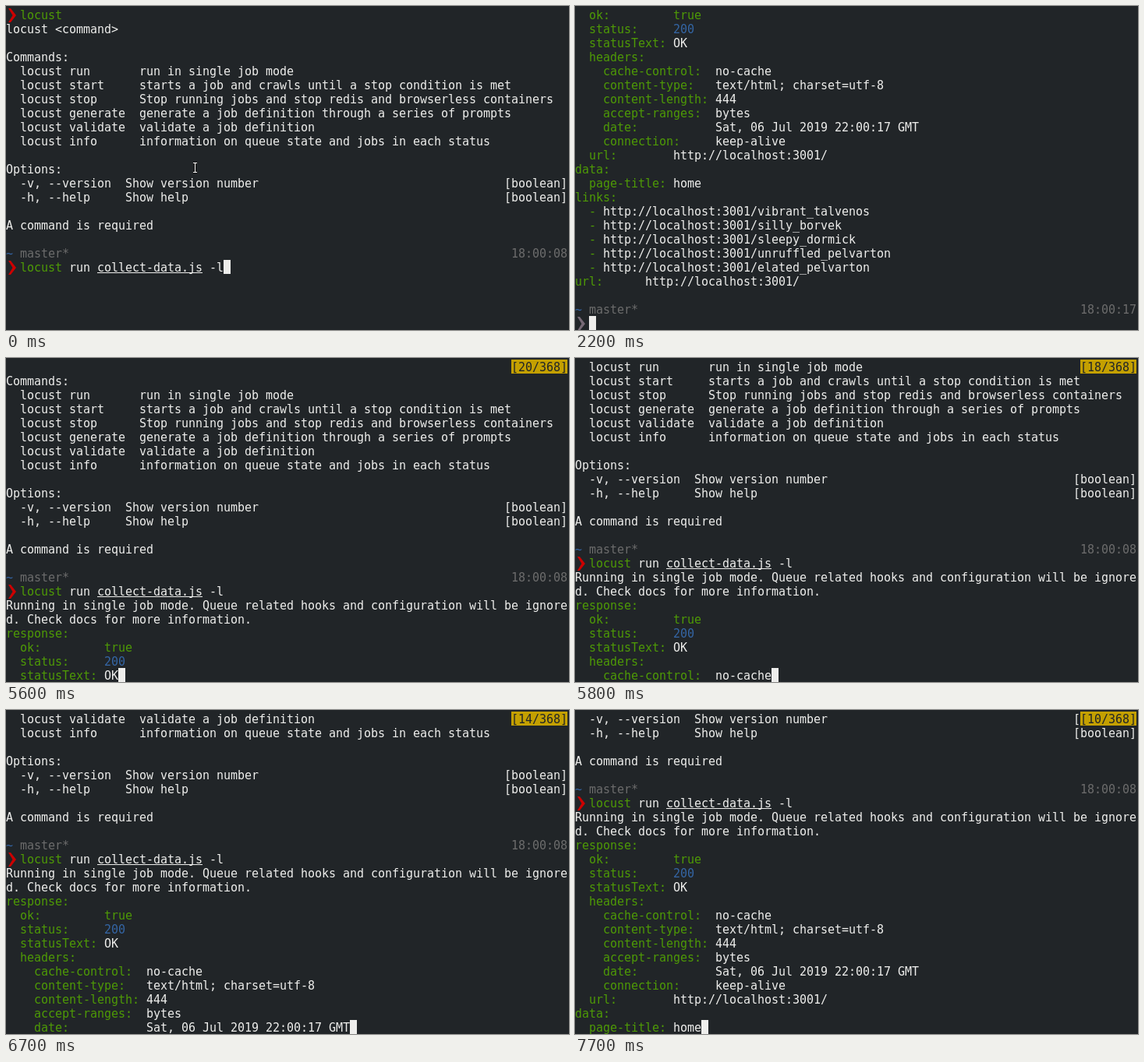
An HTML page for the animation above (8000 ms loop, 722 by 416 pixels).

```html
<!DOCTYPE html>
<html lang="en">
<head>
<meta charset="utf-8">
<title>Terminal session</title>
<style>
  html, body { margin: 0; width: 722px; height: 416px; overflow: hidden; background: #212528; }
  body { position: relative; }
  pre, #badge {
    margin: 0; color: #eeeeec;
    font: 15px/18px "DejaVu Sans Mono", monospace;
    letter-spacing: -.0308px; /* 9px cells */
    font-variant-ligatures: none;
  }
  pre { position: absolute; left: 0; top: 3px; }
  pre div { height: 18px; }
  #cursor, #badge, #mouse { position: absolute; }
  #cursor { width: 9px; height: 18px; background: #eeeeec; }
  #badge { left: 648px; top: 2px; width: 72px; height: 17px; padding-top: 1px; background: #c4a000; color: #212528; }
  #mouse { left: 0; top: 0; fill: none; }
  .green { color: #4e9a06; }
  .blue { color: #3465a4; }
  .grey { color: #6c6c6c; }
  .file { text-decoration: underline 1px; text-underline-offset: 1px; text-decoration-skip-ink: none; }
  .prompt { position: relative; color: #cc0000; }
  .prompt.done { color: #776a76; }
  .prompt::before {
    content: ""; position: absolute; left: 3px; top: 0; width: 10px; height: 18px;
    background: currentColor;
    clip-path: polygon(0 0, 30% 0, 100% 50%, 30% 100%, 0 100%, 55% 50%);
  }
</style>
</head>
<body>
<pre id="screen"></pre>
<div id="cursor"></div>
<div id="badge"></div>
<svg id="mouse" width="722" height="416">
  <path id="beam" d="M240 201.5h2m1 0h2M242.5 201v13M240 213.5h2m1 0h2" stroke="#111" stroke-width="3"/>
  <use href="#beam"/>
  <path d="M240 201.5h5M242.5 201v13M240 213.5h5" stroke="#fff"/>
</svg>
<script>
const ROWS = 23, LOOP = 8000;
const span = (cls, text) => `<span class="${cls}">${text}</span>`;
const green = text => span('green', text);
const prompt = (cls = '') => span('prompt ' + cls, ' ') + ' ';
const status = time => span('blue', '~') + span('grey', ' master*'.padEnd(71) + time);
const command = (name, about) => `  locust ${name}`.padEnd(19) + about;
const option = (flags, about) => `  ${flags}`.padEnd(17) + about.padEnd(54) + '[boolean]';
const field = (key, value, column) => green(key.padEnd(column)) + value;
const head = (key, value) => field(`    ${key}:`, value, 20);
const home = 'http://localhost:3001/';
const link = name => green('  - ') + home + name;

const lines = [
  prompt() + green('locust'),
  'locust &lt;command&gt;',
  '',
  'Commands:',
  command('run', 'run in single job mode'),
  command('start', 'starts a job and crawls until a stop condition is met'),
  command('stop', 'Stop running jobs and stop redis and browserless containers'),
  command('generate', 'generate a job definition through a series of prompts'),
  command('validate', 'validate a job definition'),
  command('info', 'information on queue state and jobs in each status'),
  '',
  'Options:',
  option('-v, --version', 'Show version number'),
  option('-h, --help', 'Show help'),
  '',
  'A command is required',
  '',
  status('18:00:08'),
  prompt() + green('locust') + ' run ' + span('file', 'collect-data.js') + ' -l',
  'Running in single job mode. Queue related hooks and configuration will be ignore',
  'd. Check docs for more information.',
  green('response:'),
  field('  ok:', green('true'), 14),
  field('  status:', span('blue', '200'), 14),
  field('  statusText:', 'OK', 14),
  green('  headers:'),
  head('cache-control', 'no-cache'),
  head('content-type', 'text/html; charset=utf-8'),
  head('content-length', '444'),
  head('accept-ranges', 'bytes'),
  head('date', 'Sat, 06 Jul 2019 22:00:17 GMT'),
  head('connection', 'keep-alive'),
  field('  url:', home, 14),
  green('data:'),
  field('  page-title:', 'home', 14),
  green('links:'),
  ...['vibrant_talvenos', 'silly_borvek', 'sleepy_dormick', 'unruffled_pelvarton', 'elated_pelvarton'].map(link),
  field('url:', home, 10),
  '',
  status('18:00:17'),
  prompt('done')
];

// Shell phase: start time, first line, printed lines, cursor row, cursor column
const shell = [
  [0, 0, 19, 18, 31],
  [700, 0, 19, 19, 0],
  [1700, 0, 21, 21, 0],
  [2200, 22, 45, 22, 2]
];
// Scrollback phase: start time, lines scrolled back
const scrollback = [
  [3800, 21], [5600, 20], [5700, 19], [5800, 18], [6200, 17], [6400, 16],
  [6700, 14], [7000, 13], [7200, 12], [7500, 11], [7700, 10]
];

const [screen, cursor, badge, mouse] =
  ['screen', 'cursor', 'badge', 'mouse'].map(id => document.getElementById(id));
const current = (steps, t) => steps.findLast(([start]) => start <= t);
let shown;

function draw(t) {
  mouse.style.display = t < 500 ? '' : 'none';
  const scroll = current(scrollback, t);
  const step = scroll || current(shell, t);
  if (step === shown) return;
  shown = step;

  let [, top, count, row, column] = current(shell, t);
  if (scroll) top -= scroll[1];
  screen.innerHTML = lines.slice(top, Math.min(count, top + ROWS))
    .map(line => `<div>${line}</div>`).join('');
  if (scroll) column = screen.lastChild.textContent.length;

  cursor.style.left = column * 9 + 'px';
  cursor.style.top = 2 + row * 18 + 'px';
  badge.style.display = scroll ? '' : 'none';
  badge.textContent = scroll ? `[${scroll[1]}/368]` : '';
}

function tick() {
  draw(performance.now() % LOOP);
  requestAnimationFrame(tick);
}
tick();
</script>
</body>
</html>
```
